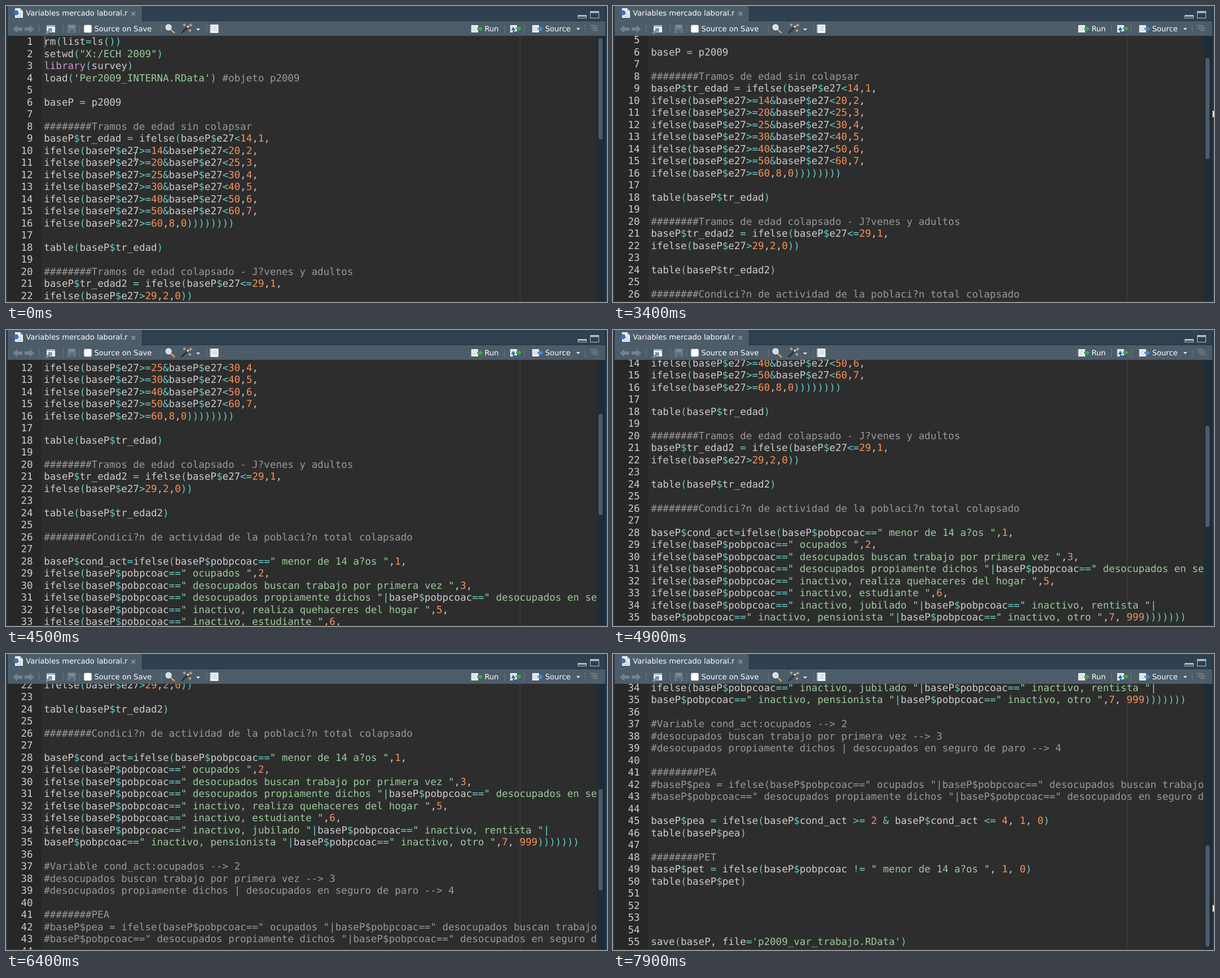
Recreate the animation shown at these times as an HTML page. Size 1065x526 px, loop 8 s.

```html
<!DOCTYPE html>
<html lang="es">
<head>
<meta charset="utf-8">
<title>Editor</title>
<style>
  html, body { margin: 0; width: 100%; height: 100%; overflow: hidden; background: #2d2d2d; }
  svg { display: block; width: 1065px; height: 526px; }
  text { white-space: pre; text-rendering: geometricPrecision; }
  .ui { font: 13.1px "DejaVu Sans", sans-serif; fill: #fff; }
  .code { font: 17.5px "DejaVu Sans Mono", monospace; fill: #ccc; }
  .num { text-anchor: end; }
  .comment { fill: #999; }
  .string { fill: #9c9; }
  .keyword { fill: #c9c; }
  .number { fill: #f99157; }
  .op { fill: #6cc; }
</style>
</head>
<body>
<svg viewBox="0 0 1065 526">
  <defs>
    <clipPath id="pane"><rect x="2" y="53" width="1045" height="472"/></clipPath>
    <g id="run">
      <rect x=".5" y="1" width="12" height="13" fill="#f4f6f7"/>
      <path d="M2 4h8M2 7h6M2 10h8" stroke="#b4bcc4"/>
    </g>
    <path id="arrow" d="M0 -1.8h5v-3l5.500 4.800l-5.500 4.800v-3h-5z"/>
  </defs>

  <!-- editor pane -->
  <rect width="1065" height="526" fill="#2d2d2d"/>
  <rect x="2" y="53" width="61" height="473" fill="#272727"/>
  <path d="M911 53V525" stroke="#464646"/>
  <g clip-path="url(#pane)"><g id="lines" class="code">
    <path d="M69 54v20" stroke="#666" stroke-width="2"/>
  </g></g>
  <rect x="1047" y="53" width="15" height="472" fill="#1e2d38"/>
  <rect id="thumb" x="1050" y="57" width="7" height="180" rx="3.5" fill="#4d5c69"/>

  <!-- tab strip and toolbar -->
  <rect width="1065" height="27" fill="#2f4050"/>
  <rect y="27" width="1065" height="26" fill="#4d5c69"/>
  <path d="M2 27V4q0-4 4-4H237q4 0 4 4V27" fill="#4d5c69"/>
  <path d="M241.5 2V26.5H1062" fill="none" stroke="#22323f"/>
  <path d="M1 0V526M1064 0V526" stroke="#2b4051" stroke-width="2"/>
  <path d="M0 525.5H1065" stroke="#2b4051"/>
  <path d="M2.5 0V526M1062.5 0V526" stroke="#1b2934"/>

  <path d="M16 4h9l5 5v12H16z" fill="#f3f5f7"/>
  <path d="M25 4v5h5z" fill="#b9c2ca"/>
  <path d="M23 13h5M23 16h5M18 18.500h10" stroke="#a9b3bc"/>
  <circle cx="18" cy="12" r="4.500" fill="#3b74bd"/>
  <text class="ui" x="35.300" y="17">Variables mercado laboral.r</text>
  <path d="M222.5 10.5l6.5 6.5m0-6.5l-6.5 6.5" stroke="#89949d" stroke-width="1.8"/>

  <g fill="none" stroke="#b6c0c8">
    <rect x="1013.5" y="16.5" width="15" height="5"/>
    <rect x="1035.5" y="9.5" width="15" height="12"/>
    <path d="M1013 17.5h16M1035 11h16" stroke-width="3"/>
  </g>

  <g fill="#74818b">
    <path d="M12 41l8-7v4h9v6h-9v4z"/>
    <path d="M50 41l-8-7v4h-9v6h9v4z"/>
  </g>
  <path d="M58.5 33v15M101.5 33v15M130.5 33v15M275.5 33v15M355.5 33v15M883.5 33v15M918.5 33v15M1026.5 33v15" stroke="#6a7782"/>

  <rect x="72" y="34" width="15" height="13" fill="#eef1f3"/>
  <path d="M72 35.5h15" stroke="#a5b0b9" stroke-width="3"/>
  <path d="M69 48l7-6-2.5-2.5h8v8L79 45l-6 5z" fill="#7d8a94"/>

  <rect x="109" y="33" width="15" height="15" rx="1.5" fill="#6a7782"/>
  <rect x="112" y="34" width="9" height="5" fill="#7f8b95"/>
  <rect x="113" y="42" width="7" height="6" fill="#5a6873"/>

  <rect x="138" y="33.5" width="14" height="14" rx="2.5" fill="#fff" stroke="#7b8791"/>
  <text class="ui" x="156.500" y="45">Source on Save</text>

  <path d="M291.5 41.5l6.5 6" stroke="#d29a58" stroke-width="3" stroke-linecap="round"/>
  <circle cx="288" cy="37.8" r="4.8" fill="#c9def0" stroke="#e9edf0" stroke-width="1.6"/>

  <path d="M311 48l11-11" stroke="#26323b" stroke-width="3"/>
  <path d="M321 38l2.5-2.5" stroke="#e8ecef" stroke-width="3"/>
  <path d="M316 31v5M313.5 33.5h5M327 31v6M324 34h6M326 41v5M323.500 43.500h5" stroke="#d9b27c" stroke-width="1.4"/>
  <path d="M337 40h7l-3.500 4zM1010.500 39h7l-3.500 4z" fill="#dfe4e8"/>

  <rect x="361.500" y="33" width="15" height="15" rx="1" fill="#f1f3f5"/>
  <path d="M366 37h8M366 40h8M366 43h8" stroke="#b7c0c8"/>
  <path d="M363 34v13" stroke="#8f9ba5" stroke-width="1.500" stroke-dasharray="1.500 1.500"/>

  <use href="#run" x="824" y="33"/>
  <use href="#arrow" x="834.500" y="40.500" fill="#36ad4b"/>
  <text class="ui" x="848" y="45">Run</text>

  <use href="#run" x="893" y="33"/>
  <use href="#arrow" x="903.500" y="40" fill="#36ad4b"/>
  <path d="M906 46h-7v-6m-3 3l3-4 3 4" fill="none" stroke="#2b67ae" stroke-width="2"/>

  <use href="#run" x="932" y="33"/>
  <use href="#arrow" x="941.500" y="40.500" fill="#3f8fd8"/>
  <text class="ui" x="955.500" y="45">Source</text>
  <path d="M1034 34.500h12M1037 37.500h12M1037 40.500h12M1040 43.500h9" stroke="#89959e"/>

  <!-- mouse -->
  <path id="beam" d="M-3.500-7.500h2.500l1 1 1-1h2.500M0-6.500v13M-3.500 7.500h2.500l1-1 1 1h2.500" fill="none" stroke="#d8d8d8"/>
  <path id="pointer" d="M0 0v16l3.700-3.500 2.600 6 2.600-1.100-2.600-5.900h5.200z" fill="#fff" stroke="#111"/>
</svg>

<script>
const code = `rm(list=ls())
setwd("X:/ECH 2009")
library(survey)
load('Per2009_INTERNA.RData') #objeto p2009

baseP = p2009

########Tramos de edad sin colapsar
baseP$tr_edad = ifelse(baseP$e27<14,1,
ifelse(baseP$e27>=14&baseP$e27<20,2,
ifelse(baseP$e27>=20&baseP$e27<25,3,
ifelse(baseP$e27>=25&baseP$e27<30,4,
ifelse(baseP$e27>=30&baseP$e27<40,5,
ifelse(baseP$e27>=40&baseP$e27<50,6,
ifelse(baseP$e27>=50&baseP$e27<60,7,
ifelse(baseP$e27>=60,8,0))))))))

table(baseP$tr_edad)

########Tramos de edad colapsado - J?venes y adultos
baseP$tr_edad2 = ifelse(baseP$e27<=29,1,
ifelse(baseP$e27>29,2,0))

table(baseP$tr_edad2)

########Condici?n de actividad de la poblaci?n total colapsado

baseP$cond_act=ifelse(baseP$pobpcoac==" menor de 14 a?os ",1,
ifelse(baseP$pobpcoac==" ocupados ",2,
ifelse(baseP$pobpcoac==" desocupados buscan trabajo por primera vez ",3,
ifelse(baseP$pobpcoac==" desocupados propiamente dichos "|baseP$pobpcoac==" desocupados en seguro de paro ",4,
ifelse(baseP$pobpcoac==" inactivo, realiza quehaceres del hogar ",5,
ifelse(baseP$pobpcoac==" inactivo, estudiante ",6,
ifelse(baseP$pobpcoac==" inactivo, jubilado "|baseP$pobpcoac==" inactivo, rentista "|
baseP$pobpcoac==" inactivo, pensionista "|baseP$pobpcoac==" inactivo, otro ",7, 999)))))))

#Variable cond_act:ocupados --> 2
#desocupados buscan trabajo por primera vez --> 3
#desocupados propiamente dichos | desocupados en seguro de paro --> 4

########PEA
#baseP$pea = ifelse(baseP$pobpcoac==" ocupados "|baseP$pobpcoac==" desocupados buscan trabajo por primera vez "|
#baseP$pobpcoac==" desocupados propiamente dichos "|baseP$pobpcoac==" desocupados en seguro de paro ",1,0)

baseP$pea = ifelse(baseP$cond_act >= 2 & baseP$cond_act <= 4, 1, 0)
table(baseP$pea)

########PET
baseP$pet = ifelse(baseP$pobpcoac != " menor de 14 a?os ", 1, 0)
table(baseP$pet)




save(baseP, file='p2009_var_trabajo.RData')`;

const $ = id => document.getElementById(id);
const token = /(?<comment>#.*)|(?<string>"[^"]*"|'[^']*')|(?<keyword>\blibrary\b)|(?<number>\b\d+\b)|(?<op>[()$<>=&|!]+)/g;

function add(parent, tag, attrs, text) {
  const el = document.createElementNS("http://www.w3.org/2000/svg", tag);
  for (const k in attrs) el.setAttribute(k, attrs[k]);
  el.textContent = text;
  return parent.appendChild(el);
}

code.split("\n").forEach((line, i) => {
  const y = 69 + Math.round(i * 21.5);
  add($("lines"), "text", { class: "num", x: 47.5, y }, i + 1);
  const row = add($("lines"), "text", { x: 67.3, y }, "");
  let end = 0;
  for (const m of line.matchAll(token)) {
    row.append(line.slice(end, m.index));
    const kind = Object.keys(m.groups).find(k => m.groups[k]);
    add(row, "tspan", { class: kind }, m[0]);
    end = m.index + m[0].length;
  }
  row.append(line.slice(end));
});

// Keys are [ms, values...], joined linearly
const scroll = [[2800, 0], [2900, 10], [3000, 24], [3100, 24], [3400, 89], [4500, 233],
  [5300, 335], [5400, 335], [5500, 341], [6400, 460], [7800, 713]];
const beam = [[0, 229, 268], [100, 370, 385], [200, 473, 460], [300, 473, 460], [600, 146, 310],
  [800, 290, 193], [1200, 794.5, 339], [1300, 1013, 345], [1400, 1090, 345]];
const pointer = [[2100, 1080, 143], [2200, 1061, 143], [2300, 1057, 144], [2400, 1057, 144],
  [2500, 1058, 144], [2800, 1058, 144], [3000, 1060, 157], [3100, 1060, 157], [3400, 1062, 184],
  [3700, 1070, 209], [7800, 1070, 432], [7900, 1062, 444]];

function at(keys, t) {
  const i = keys.findIndex(k => k[0] > t);
  if (i < 0) return keys.at(-1).slice(1);
  if (i === 0) return keys[0].slice(1);
  const a = keys[i - 1], b = keys[i], f = (t - a[0]) / (b[0] - a[0]);
  return a.slice(1).map((v, j) => v + (b[j + 1] - v) * f);
}

const move = (id, x, y) => $(id).setAttribute("transform", `translate(${x} ${y})`);

function draw(now) {
  const t = Math.floor(now % 8000 / 100) * 100;
  const top = Math.round(at(scroll, t)[0]);
  move("lines", 0, -top);
  move("thumb", 0, Math.round(top * 283 / 713));
  move("beam", ...at(beam, t));
  move("pointer", ...at(pointer, t));
}

const start = performance.now();
function frame() {
  draw(performance.now() - start);
  requestAnimationFrame(frame);
}
frame();
</script>
</body>
</html>
```
